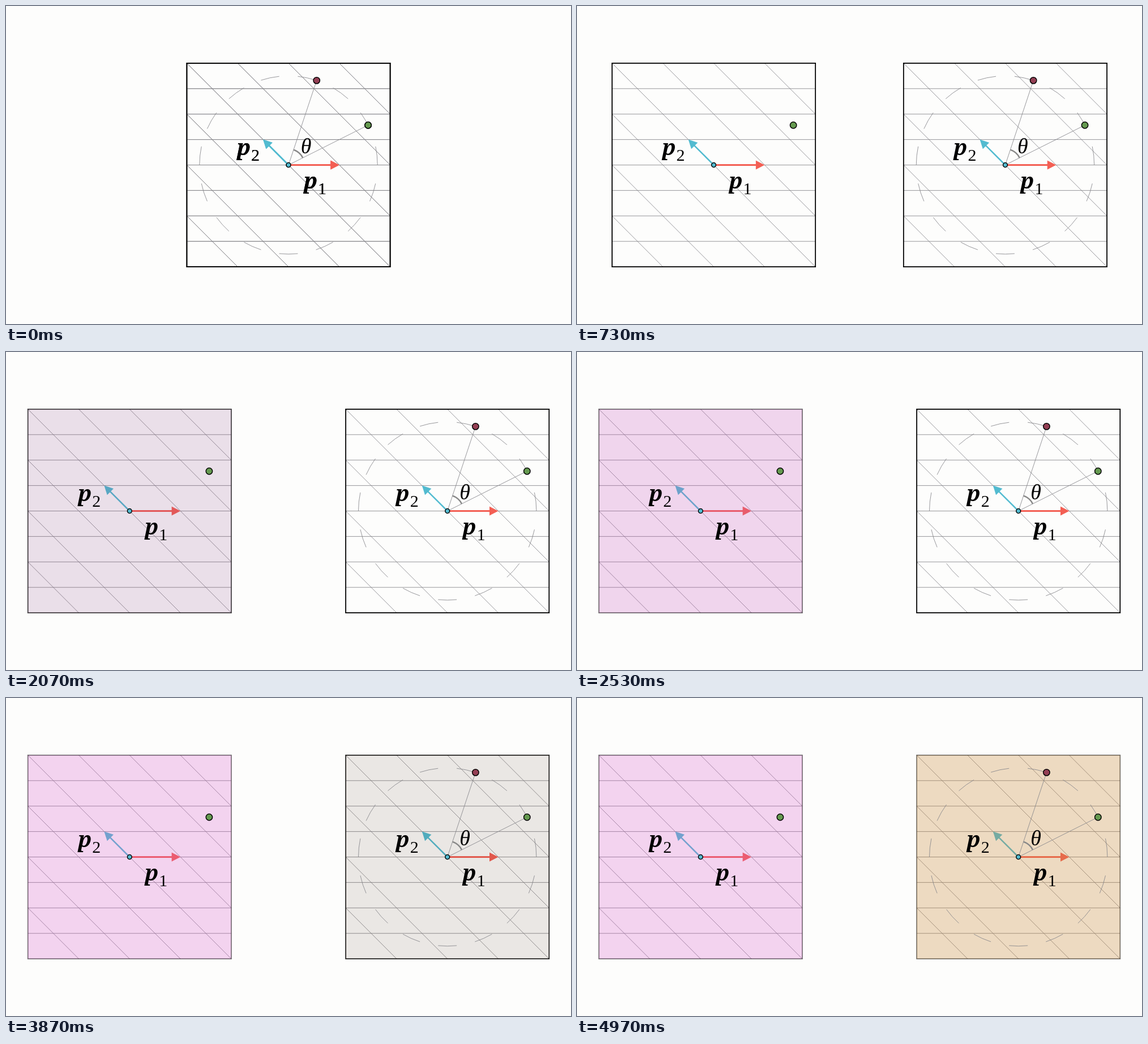
Animation, 998 px wide and 561 px high, one loop 5010 ms. Source, as an HTML page:

```html
<!DOCTYPE html>
<html lang="en">
<head>
<meta charset="utf-8">
<title>Lattice panels</title>
<style>
  html, body { margin: 0; width: 100%; height: 100%; overflow: hidden; background: #fdfdfc; }
  svg { display: block; width: 998px; height: 561px; }
  .thin { fill: none; stroke: #85858a; stroke-width: .85; }
  .border { fill: none; stroke: #000; stroke-width: 1.8; }
  .dot { stroke: #000; stroke-width: 1.5; }
  text { text-anchor: middle; font: 30px "Liberation Serif", serif; }
  .vec { font: italic bold 38px "Noto Serif", "Liberation Serif", serif; }
  .angle { font: italic 38px "Liberation Serif", serif; }
</style>
</head>
<body>
<svg id="stage" viewBox="0 0 998 561"></svg>
<script>
const STEP = 44.9, HALF = 4 * STEP, RADIUS = 157.2;
const RED = '#f35f54', BLUE = '#52bbd0';
const stage = document.getElementById('stage');

const polar = (r, deg) => {
  const a = deg * Math.PI / 180;
  return [r * Math.cos(a), -r * Math.sin(a)];
};
const arc = (r, from, to) => `M${polar(r, from)}A${r} ${r} 0 0 0 ${polar(r, to)}`;
const dot = ([x, y], r, fill) => `<circle class="dot" cx="${x}" cy="${y}" r="${r}" fill="${fill}"/>`;
const arrow = (length, deg, width, color) => `<g transform="rotate(${-deg})" fill="${color}">
  <path d="M0 0H${length - 12}" stroke="${color}" stroke-width="${width}"/>
  <path d="M${length} 0l-15.5 -8v16z"/></g>`;
const label = (x, y, index) => `<text class="vec" x="${x}" y="${y}">p</text>
  <text x="${x + 20.5}" y="${y + 10.5}">${index}</text>`;
const square = attrs => `<rect x="${-HALF}" y="${-HALF}" width="${2 * HALF}" height="${2 * HALF}" ${attrs}/>`;

function grid() {
  let d = '';
  for (let k = -3; k <= 3; k++) {
    const shift = 2 * STEP * k;
    d += `M${-HALF} ${k * STEP}H${HALF}`;
    d += `M${Math.max(-HALF, shift - HALF)} ${Math.max(-HALF, -shift - HALF)}`;
    d += `L${Math.min(HALF, HALF + shift)} ${Math.min(HALF, HALF - shift)}`;
  }
  return `<path class="thin" d="${d}"/>`;
}

const green = polar(RADIUS, 26.57), maroon = polar(RADIUS, 71.57);

function rotation() {
  let d = `M${green}L0 0L${maroon}`;
  for (let a = 0; a < 360; a += 24) d += arc(RADIUS, a, a + 12);
  return `<path class="thin" d="${d}"/>
    <path d="${arc(28.3, 26.57, 71.57)}" fill="none" stroke="#888" stroke-width="2.5"/>
    <text class="angle" x="31" y="-21">θ</text>${dot(maroon, 5.7, '#943f54')}`;
}

const panel = extra => `<g>${grid()}
  ${arrow(2 * STEP, 0, 3.1, RED)}${arrow(STEP * Math.SQRT2, 135, 2.5, BLUE)}
  ${square('class="border"')}${square('class="tint"')}
  ${extra}${label(39, 41, 1)}${label(-79, -18, 2)}
  ${dot(green, 5.7, '#659a50')}${dot([0, 0], 3.9, BLUE)}</g>`;

stage.innerHTML = panel('') + panel(rotation());

const panels = [
  { side: -1, start: 1, color: [209, 85, 197], opacity: .25 },
  { side: 1, start: 3, color: [199, 133, 56], opacity: .3 }
].map((p, i) => {
  const node = stage.children[i];
  return { ...p, node, tint: node.querySelector('.tint'), border: node.querySelector('.border') };
});

// Normalised sigmoid easing
const sigmoid = x => 1 / (1 + Math.exp(-x));
function smooth(t) {
  t = Math.min(1, Math.max(0, t));
  const low = sigmoid(-5);
  return (sigmoid(10 * (t - .5)) - low) / (1 - 2 * low);
}

function draw(now) {
  // 30 pictures per second
  const time = Math.min(149, Math.floor((now % 5010 + 4) * .03)) / 30;
  const shift = 280.7 * smooth(time);
  for (const p of panels) {
    const a = smooth((time - p.start) / 2);
    p.node.setAttribute('transform', `translate(${499 + p.side * shift} 280.5)`);
    // Colour grows from black while the opacity rises
    p.tint.setAttribute('fill', `rgb(${p.color.map(c => Math.round(c * a))})`);
    p.tint.setAttribute('fill-opacity', p.opacity * a);
    p.border.setAttribute('stroke-opacity', 1 - .45 * a);
  }
}

const begin = performance.now();
function tick() {
  draw(performance.now() - begin);
  requestAnimationFrame(tick);
}
tick();
</script>
</body>
</html>
```
